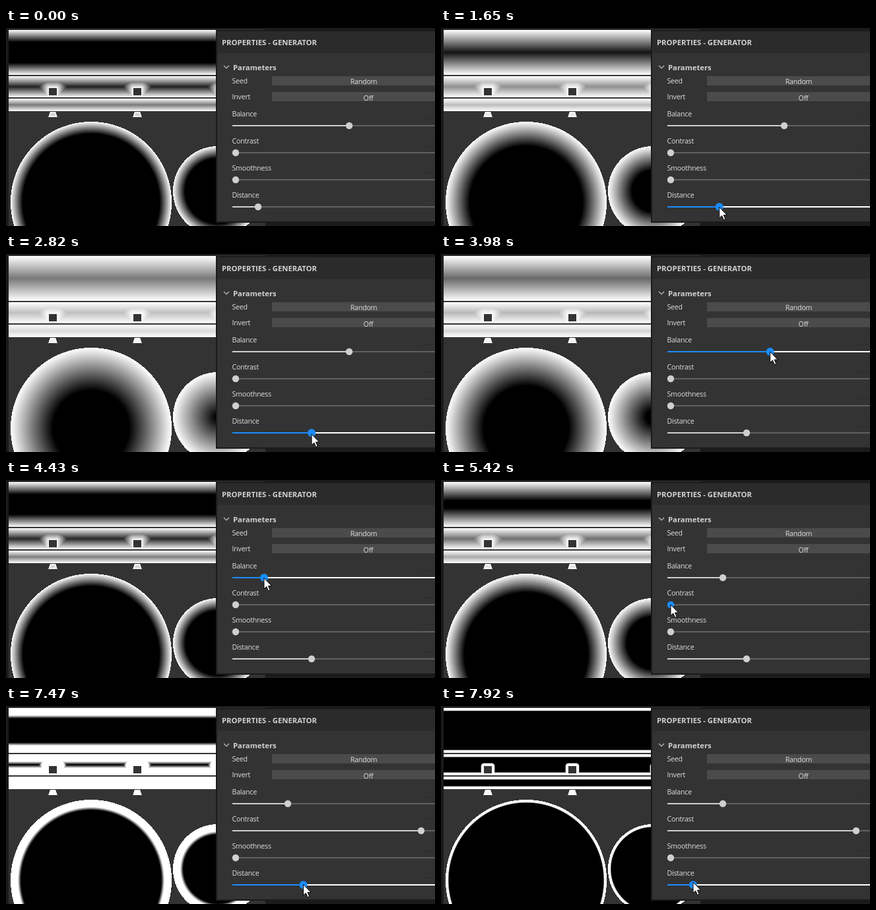
Recreate the animation shown at these times as an HTML page with a canvas. Size 650 by 300 pixels, loop 8000 ms.

```html
<!DOCTYPE html>
<html lang="en">
<head>
<meta charset="utf-8">
<title>Generator properties</title>
<style>
  html, body { margin: 0; width: 100%; height: 100%; overflow: hidden; background: #1b1b1b; }
  canvas, svg { position: absolute; left: 0; top: 0; display: block; }
  text { font: 10.7px "Open Sans", "Noto Sans", sans-serif; letter-spacing: -.25px; fill: #dedede; }
  .head { font-size: 11.3px; font-weight: 700; letter-spacing: 0; fill: #d2d2d2; }
  .mid { text-anchor: middle; }
</style>
</head>
<body>
<canvas id="field" width="393" height="300"></canvas>
<svg width="650" height="300" viewBox="0 0 650 300">
  <rect x="318" y="3" width="332" height="292" fill="#1b1b1b"/>
  <rect x="320" y="5" width="330" height="288" fill="#333"/>
  <rect x="320" y="5" width="330" height="33" fill="#2b2b2b"/>
  <text class="head" x="327" y="26">PROPERTIES - GENERATOR</text>
  <path d="M330 57l4 4 4-4" fill="none" stroke="#c4c4c4" stroke-width="1.2"/>
  <text class="head" x="344" y="64">Parameters</text>
  <rect x="403" y="73" width="247" height="14" fill="#4b4b4b"/>
  <rect x="403" y="97" width="247" height="14" fill="#4b4b4b"/>
  <text x="342.5" y="84">Seed</text>
  <text x="342.5" y="108">Invert</text>
  <text class="mid" x="542" y="85">Random</text>
  <text class="mid" x="549" y="110">Off</text>
  <g id="sliders"></g>
  <path id="cursor" d="M0 0V16.5L3.8 13 6.6 19.4 9.2 18.2 6.5 12H11.6Z" fill="#fff" stroke="#000"/>
</svg>
<script>
const LOOP = 8000, START = 740, STEP = 89.75, LAG = 40;
const MIN_X = 348, RANGE = 344, REACH = 185;
const W = 393, H = 300, BACK = 51, EDGE = 27;
const clamp = v => Math.max(0, Math.min(1, v));
const mix = (a, b, k) => a + (b - a) * k;
const span = (t, a, b) => clamp((t - a) / (b - a));

const sliders = ["Balance", "Contrast", "Smoothness", "Distance"]
  .map((name, i) => ({ name, y: 148 + 41 * i, x: MIN_X }));
const [balance, contrast, , distance] = sliders;
balance.x = 520;
distance.x = 382;

// Each leg is [from, to, end x]; drift is the hand's vertical slip while dragging.
const drags = [
  { slider: distance, legs: [[1365, 2290, 513], [2460, 2805, 463]], drift: 2 },
  { slider: balance, legs: [[3890, 4440, 388], [4700, 4990, 427]], drift: 1 },
  { slider: contrast, legs: [[5600, 6535, 629]], drift: -9 },
  { slider: distance, legs: [[7300, 7880, 382]], drift: -4 }
];
for (const d of drags) {
  d.start = d.legs[0][0];
  d.end = d.legs[d.legs.length - 1][1];
}

function knobX(slider, t) {
  let x = slider.x;
  for (const d of drags) {
    if (d.slider === slider) for (const [a, b, to] of d.legs) x = mix(x, to, span(t, a, b));
  }
  return x;
}

// The pointer glides to a knob, follows it, then leaves for the next one.
function pointer(t) {
  let from = { x: 402, y: 296 }, left = START;
  for (const d of drags) {
    const spot = time => ({
      x: knobX(d.slider, time),
      y: d.slider.y + d.drift * span(time, d.start, d.end)
    });
    if (t < d.start) {
      const to = spot(d.start), k = span(t, left, d.start - 190);
      return { x: mix(from.x, to.x, k), y: mix(from.y, to.y, k) };
    }
    left = d.end + 200;
    from = spot(Math.min(t, d.end));
    if (t < left) return from;
  }
  return from;
}

const NS = "http://www.w3.org/2000/svg";
function add(parent, tag, attrs) {
  const el = document.createElementNS(NS, tag);
  set(el, attrs);
  return parent.appendChild(el);
}
function set(el, attrs) {
  for (const k in attrs) el.setAttribute(k, attrs[k]);
}
const group = document.getElementById("sliders");
for (const s of sliders) {
  add(group, "text", { x: 342.5, y: s.y - 14 }).textContent = s.name;
  add(group, "rect", { x: 632, y: s.y - 11, width: 18, height: 1, fill: "#2c2c2c" });
  s.rest = add(group, "rect", { x: 343, y: s.y - 1, width: 307, height: 2 });
  s.fill = add(group, "rect", { x: 343, y: s.y - 1, height: 2 });
  s.knob = add(group, "circle", { cy: s.y });
}

// Signed distance to the nearest outline, positive inside a shape
const band = (y, top, bottom) => Math.min(y - top, bottom - y);
const disc = (x, y, cx, cy, r) => r - Math.hypot(x - cx, y - cy);
function hole(x, y, cx) {
  const dx = Math.abs(x - cx) - 6, dy = Math.abs(y - 96.5) - 5.5;
  return Math.hypot(Math.max(dx, 0), Math.max(dy, 0)) + Math.min(Math.max(dx, dy), 0);
}
function foot(x, y, cx) {
  const side = (4 + (y - 127) * 3 / 8 - Math.abs(x - cx)) / Math.hypot(1, 3 / 8);
  return Math.min(band(y, 127, 135), side);
}
function shape(x, y) {
  const cx = 71 + 128 * Math.round((x - 71) / 128);
  return Math.max(
    band(y, 3, 71),
    Math.min(band(y, 73, 105), hole(x, y, cx)),
    band(y, 107, 126),
    foot(x, y, cx),
    disc(x, y, 129, 264, 122),
    disc(x, y, 321, 247, 68));
}
const dist = new Float32Array(W * H);
for (let i = 0; i < dist.length; i++) dist[i] = shape(i % W + .5, Math.floor(i / W) + .5);

const ctx = document.getElementById("field").getContext("2d");
const img = ctx.createImageData(W, H);

function paintField(t) {
  const [bal, con, , far] = sliders.map(s => (knobX(s, t) - MIN_X) / RANGE);
  const reach = far * REACH;
  const half = Math.max(bal * (1 - con), .001);
  const low = 1 - bal - half;
  for (let i = 0; i < dist.length; i++) {
    const d = dist[i], v = 1 - clamp(d / reach);
    let g = d > 0 ? 255 * clamp((v - low) / (2 * half)) : BACK;
    if (i % W < 4 || i < W * 2) g = EDGE;
    img.data.set([g, g, g, 255], i * 4);
  }
  ctx.putImageData(img, 0, 0);
}

const cursor = document.getElementById("cursor");

function draw(t) {
  const p = pointer(t);
  for (const s of sliders) {
    const x = knobX(s, t);
    const down = drags.some(d => d.slider === s && t > d.start - 10 && t < d.end + 170);
    const hot = t >= START && (down || Math.hypot(p.x - x, p.y - s.y) < 9);
    const color = hot ? "#1a8cff" : "#cfcfcf";
    set(s.rest, { fill: down ? "#fff" : "#606060" });
    set(s.fill, { fill: color, width: x - 343 });
    set(s.knob, { fill: color, cx: x, r: down ? 6 : 5.2 });
  }
  paintField(t - LAG);
  set(cursor, {
    transform: `translate(${p.x} ${p.y})`,
    visibility: t < START ? "hidden" : "visible"
  });
}

// Everything moves in even ticks after the opening hold.
let last = -1;
function frame() {
  const t = performance.now() % LOOP;
  const tick = t < START ? 0 : START + Math.floor((t - START) / STEP) * STEP + 8;
  if (tick !== last) draw(last = tick);
  requestAnimationFrame(frame);
}
frame();
</script>
</body>
</html>
```
